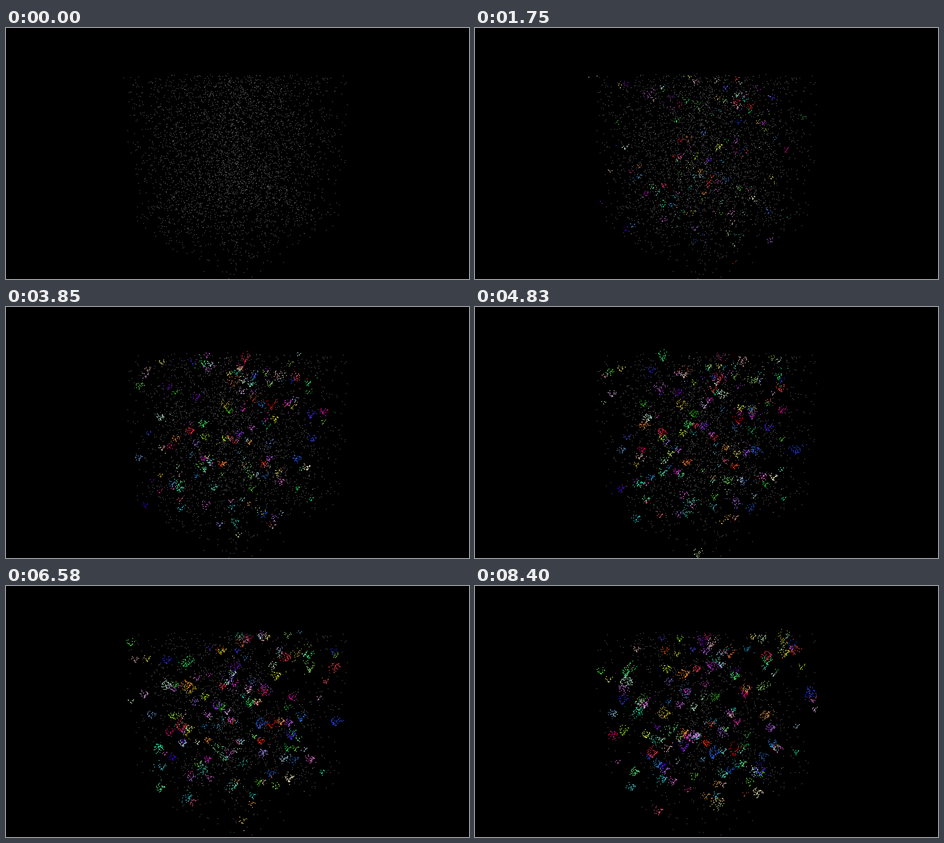
Animation, 1016 px wide and 551 px high, one loop 8470 ms. Source, as an HTML page with a canvas:

```html
<!DOCTYPE html>
<html lang="en">
<head>
<meta charset="utf-8">
<title>Swarming points</title>
<style>
  html, body { margin: 0; width: 100%; height: 100%; overflow: hidden; background: #000; }
  canvas { display: block; }
</style>
</head>
<body>
<canvas id="stage" width="1016" height="551"></canvas>
<script>
const W = 1016, H = 551;
const STEP = 70, STEPS = 121;
const POINTS = 4100, SWARMS = 135;
const ctx = document.getElementById('stage').getContext('2d');

let seed = 20731;
function rand() {
  seed = (seed + 0x6D2B79F5) | 0;
  let t = Math.imul(seed ^ (seed >>> 15), 1 | seed);
  t = (t + Math.imul(t ^ (t >>> 7), 61 | t)) ^ t;
  return ((t ^ (t >>> 14)) >>> 0) / 4294967296;
}
const spread = () => rand() * 2 - 1;
const vec = () => [spread(), spread(), spread()];

// Camera: a cube seen corner-on, slightly from above
const YAW = Math.PI / 4 + 0.02, PITCH = 0.29, DIST = 4, FOCAL = 683;
const CX = 504, CY = 281;
const cy = Math.cos(YAW), sy = Math.sin(YAW);
const cp = Math.cos(PITCH), sp = Math.sin(PITCH);
function project([x, y, z]) {
  const side = x * cy - z * sy;
  const near = x * sy + z * cy;
  const scale = FOCAL / (DIST - y * sp - near * cp);
  return [CX + side * scale, CY - (y * cp - near * sp) * scale];
}
// Stage position to the upright plane through the middle of the cube
function unproject(px, py) {
  const up = CY - py;
  const y = up * DIST / (cp * FOCAL + up * sp);
  const side = (px - CX) * (DIST - y * sp) / FOCAL;
  return [side * cy, y, -side * sy];
}

// A wandering walk that turns back at the cube's faces
function walk(pos, steps, dir = vec()) {
  const speed = 0.011 + rand() * 0.009;
  const path = [];
  for (let k = 0; k < steps; k++) {
    path.push(pos);
    const turn = vec();
    dir = dir.map((d, i) => d + turn[i] * 0.3);
    const len = Math.hypot(...dir) || 1;
    dir = dir.map(d => d / len);
    pos = pos.map((p, i) => {
      const next = p + dir[i] * speed;
      if (Math.abs(next) > 1.02 && next * dir[i] > 0) dir[i] = -dir[i];
      return p + dir[i] * speed;
    });
  }
  return path;
}

// Wander to one place, then glide to another for the last steps
const GLIDE = 26;
function walkVia(a, b) {
  const lead = walk(a, STEPS - GLIDE, a.map((v, i) => v - b[i])).reverse();
  for (let k = 1; k <= GLIDE; k++) {
    lead.push(a.map((v, i) => v + (b[i] - v) * k / GLIDE));
  }
  return lead;
}

function makeSwarm() {
  const hue = Math.floor(rand() * 360);
  const light = rand() < 0.15 ? 85 : 42 + rand() * 26;
  return {
    path: walk(vec(), STEPS),
    reach: 0.075 + rand() * 0.075,
    trail: rand() * 0.35,
    color: `hsl(${hue}, ${60 + rand() * 40}%, ${light}%)`,
    size: 0
  };
}

function makeLargeSwarm([hue, ax, ay, bx, by]) {
  return {
    path: walkVia(unproject(ax, ay), unproject(bx, by)),
    reach: 0.15,
    trail: 0.12,
    color: `hsl(${hue}, 90%, 56%)`,
    size: 0
  };
}

function makePoint() {
  const home = vec();
  return { home, spot: project(home), from: Infinity, swarm: null, rank: 0 };
}

// Hue, then the ends of the closing glide on the stage
const LARGE = [
  [243, 352, 165, 323, 255], [75, 437, 240, 420, 177],
  [8, 498, 295, 519, 302], [205, 390, 345, 402, 393],
  [352, 387, 316, 390, 372], [270, 460, 265, 459, 358],
  [222, 555, 308, 521, 374], [250, 627, 332, 627, 411],
  [62, 597, 193, 686, 143], [350, 620, 157, 643, 153],
  [160, 335, 350, 360, 268], [28, 403, 215, 465, 190]
];
const points = Array.from({ length: POINTS }, makePoint);
const swarms = LARGE.map(makeLargeSwarm)
  .concat(Array.from({ length: SWARMS }, makeSwarm));

// Each swarm collects the resting points it passes
function collect() {
  let resting = points;
  for (let k = 1; k < STEPS; k++) {
    const grow = 0.55 + 0.45 * Math.min(1, k / 40);
    for (const s of swarms) {
      const [x, y, z] = s.path[k];
      const r2 = (s.reach * grow) ** 2;
      for (const p of resting) {
        if (p.swarm) continue;
        const dx = p.home[0] - x, dy = p.home[1] - y, dz = p.home[2] - z;
        if (dx * dx + dy * dy + dz * dz < r2) {
          p.swarm = s;
          p.from = k;
          p.rank = s.size++;
        }
      }
    }
    resting = resting.filter(p => !p.swarm);
  }
}

// Evenly filled ball around a swarm's path
function ballOffset(rank) {
  const r = 0.02 * Math.cbrt(rank + 0.5);
  const h = ((rank * 0.7548777) % 1) * 2 - 1;
  const a = rank * 2.3999632;
  const q = Math.sqrt(1 - h * h);
  return [r * q * Math.cos(a), r * h, r * q * Math.sin(a)];
}

function place(p, k) {
  const { path, trail } = p.swarm;
  const lag = Math.min(p.rank * trail, 20);
  const at = path[Math.max(0, Math.round(k - lag))];
  const u = Math.min(1, (k - p.from) / 6);
  const ease = u * u * (3 - 2 * u);
  return project(p.home.map((h, i) => h + (at[i] + p.offset[i] - h) * ease));
}

function dot([x, y], size) {
  ctx.fillRect(x - size / 2, y - size / 2, size, size);
}

function draw(k) {
  ctx.fillStyle = '#000';
  ctx.fillRect(0, 0, W, H);
  ctx.fillStyle = '#808080';
  for (const p of points) if (p.from > k) dot(p.spot, 1.3);
  for (const p of points) {
    if (p.from > k) continue;
    ctx.fillStyle = p.swarm.color;
    dot(place(p, k), 1.75);
  }
}

collect();
for (const p of points) if (p.swarm) p.offset = ballOffset(p.rank);

let shown = -1;
const start = performance.now();
function tick() {
  const k = Math.floor((performance.now() - start) / STEP) % STEPS;
  if (k !== shown) draw(shown = k);
  requestAnimationFrame(tick);
}
tick();
</script>
</body>
</html>
```
